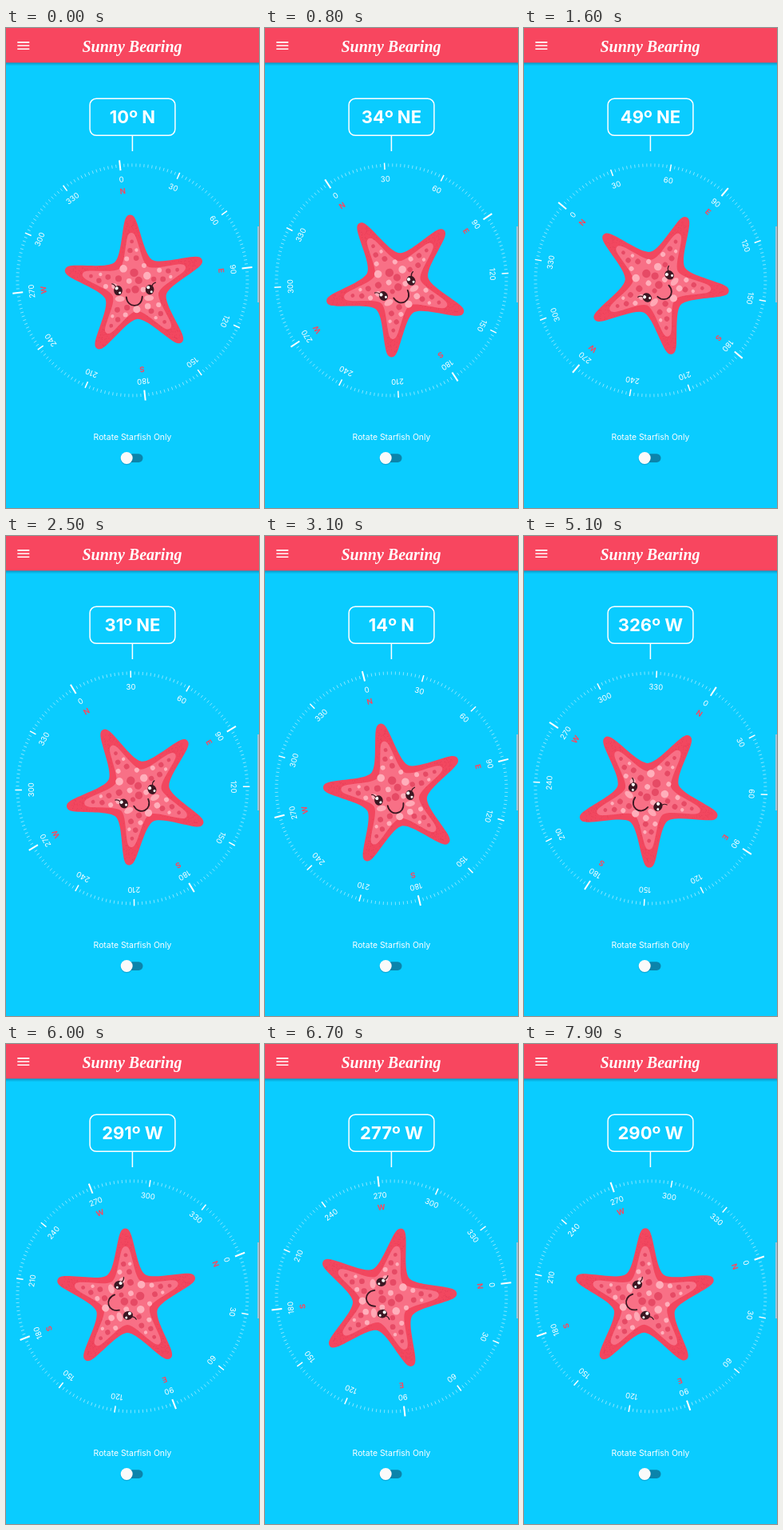
Animation of 317 by 600 pixels, one loop 8000 ms. Source, as an HTML page:

```html
<!DOCTYPE html>
<html lang="en">
<head>
<meta charset="utf-8">
<title>Sunny Bearing</title>
<style>
  html, body { margin: 0; width: 100%; height: 100%; overflow: hidden; background: #0accff; }
  svg { display: block; }
  text { font-family: Inter, "Open Sans", sans-serif; fill: #fff; text-anchor: middle; }
  .title { font: italic bold 20px "Liberation Serif", "Noto Serif", serif; }
  .reading { font-size: 22px; font-weight: 700; }
  .hint { font-size: 10.4px; }
  .degree { font-size: 9.6px; }
  .cardinal { font-size: 9.5px; font-weight: 700; fill: #f8485f; }
  .line { fill: none; stroke: #fff; }
  .ink { fill: none; stroke: #3b1722; stroke-linecap: round; }
</style>
</head>
<body>
<svg width="317" height="600" viewBox="0 0 317 600">
  <defs>
    <linearGradient id="shade" x2="0" y2="1">
      <stop stop-color="#05608a" stop-opacity=".5"/>
      <stop offset="1" stop-color="#05608a" stop-opacity="0"/>
    </linearGradient>
    <g id="eye">
      <ellipse rx="5.3" ry="6.2" fill="#3b1722"/>
      <circle cx="-1.8" cy="-2.8" r="2.1" fill="#fff"/>
      <circle cx="2" cy="2.8" r="1.5" fill="#fff"/>
    </g>
  </defs>

  <rect width="317" height="600" fill="#0accff"/>
  <rect y="43" width="317" height="4.5" fill="url(#shade)"/>
  <rect width="317" height="43.3" fill="#f8465f"/>
  <path class="line" stroke-width="1.65" d="M14.3 17.8h15M14.3 22h15M14.3 26.2h15"/>
  <text class="title" x="158" y="30">Sunny Bearing</text>

  <rect class="line" x="105.1" y="88.3" width="106.8" height="46" rx="8" stroke-width="1.5"/>
  <path class="line" stroke-width="1.5" d="M158.4 134.5V154"/>
  <text class="reading" id="reading" x="158.4" y="119"></text>

  <g id="dial">
    <g id="scale"></g>
    <g id="star" transform="translate(2.5 8.7) rotate(2)"></g>
    <g transform="translate(.6 12.3) rotate(4.5)">
      <ellipse cx="-18" cy="10.5" rx="6" ry="3.6" fill="#ffa8b5"/>
      <ellipse cx="18.5" cy="10.5" rx="6" ry="3.6" fill="#ffa8b5"/>
      <use href="#eye" x="-19.8"/>
      <use href="#eye" x="19.8"/>
      <path class="ink" stroke-width="1.2" d="M-22.8-4.6q-1-3.2-4.6-4M22.8-4.6q1-3.2 4.6-4"/>
      <path class="ink" stroke-width="1.8" d="M-9.8 8.5C-9 23 9.5 23 10.2 8.5"/>
    </g>
  </g>

  <text class="hint" x="158.5" y="515">Rotate Starfish Only</text>
  <rect x="146" y="532.3" width="25.5" height="10.6" rx="5.3" fill="#0b84ab"/>
  <circle cx="151.2" cy="538.4" r="7.8" fill="#05608a" opacity=".3"/>
  <circle cx="151.2" cy="537.5" r="7.5" fill="#fafafa"/>
  <rect x="315" y="248" width="2" height="95" fill="#9cc4d8"/>
</svg>

<script>
const $ = id => document.getElementById(id);
const RAD = Math.PI / 180;

function add(parent, tag, attrs, label) {
  const node = document.createElementNS('http://www.w3.org/2000/svg', tag);
  for (const key in attrs) node.setAttribute(key, attrs[key]);
  if (label !== undefined) node.textContent = label;
  return parent.appendChild(node);
}

function buildScale() {
  const scale = $('scale');
  for (let deg = 0; deg < 360; deg += 2) {
    const cardinal = deg % 90 === 0, major = deg % 30 === 0;
    const [from, to, width] = cardinal ? [138, 151, 2] : major ? [138.5, 147, 1.5] : [142, 146, .6];
    const transform = `rotate(${deg})`;
    add(scale, 'path', { d: `M0-${from}V-${to}`, stroke: '#fff', 'stroke-width': width,
      'stroke-opacity': major ? 1 : .8, transform });
    if (major) add(scale, 'text', { class: 'degree', y: -127, dy: '.36em', transform }, deg);
    if (cardinal) add(scale, 'text', { class: 'cardinal', y: -112, dy: '.36em', transform }, 'NESW'[deg / 90]);
  }
}

// Position along an arm: u outward from the centre, v sideways.
function armPoint(arm, u, v) {
  const a = (arm * 72 - 90) * RAD;
  return [u * Math.cos(a) - v * Math.sin(a), u * Math.sin(a) + v * Math.cos(a)];
}

function starPath(size) {
  const half = [[32.5, 23.6], [38.5, 16], [60, 13.2], [78, 8.6], [86, 6.5], [90.5, 4.5], [90.5, 0]];
  const outline = [...half.map(([u, v]) => [u, -v]), ...half.slice(0, -1).reverse()];
  let d = '';
  for (let arm = 0; arm < 5; arm++) {
    outline.forEach(([u, v], i) => {
      if (i === 0 && arm > 0) return;
      const p = armPoint(arm, u * size, v * size).map(n => n.toFixed(2)).join(' ');
      d += (i === 0 ? 'M' : i % 3 === 1 ? 'C' : ' ') + p;
    });
  }
  return d + 'Z';
}

function buildStar() {
  const star = $('star');
  const dark = '#e64a65', light = '#ffafbb';
  const dot = ([cx, cy], r, fill) => add(star, 'circle', { cx, cy, r, fill });

  add(star, 'path', { d: starPath(1), fill: '#f2475f' });

  // Fine grain on the skin
  let seed = 7;
  const rand = () => (seed = seed * 16807 % 2147483647) / 2147483647;
  let grain = '';
  for (let i = 0; i < 600; i++) {
    const u = 30 + 54 * rand();
    const reach = u < 50 ? 14 : 13 - (u - 50) * .2;
    const [x, y] = armPoint(i % 5, u, (rand() * 2 - 1) * reach);
    grain += `M${x.toFixed(1)} ${y.toFixed(1)}h.7`;
  }
  add(star, 'path', { d: grain, stroke: '#d5304e', 'stroke-width': .7, opacity: .6 });

  add(star, 'path', { d: starPath(.75), fill: '#f87086' });

  for (let arm = 0; arm < 5; arm++) {
    dot(armPoint(arm, 57, 0), 2.4, dark);
    dot(armPoint(arm, 46, -3), 3.2, dark);
    dot(armPoint(arm, 46, 5), 2.2, light);
    dot(armPoint(arm, 36, 4), 3.4, dark);
    dot(armPoint(arm, 36, -8), 3, light);
  }
  const core = [
    [-13, -24, 4.8], [0, -18, 5.2], [13, -26, 3], [-20, -12, 4], [-7, -8, 3.4], [5, -8, 4.6],
    [16, -13, 4.8], [24, -8, 3.2], [-26, -3, 3.4], [0, 3, 4.8], [10, 4, 3.4], [-9, 4, 3],
    [0, 28, 4.6], [-12, 25, 3.6], [14, 25, 3.8]
  ];
  core.forEach(([x, y, r], i) => dot([x, y], r, i % 2 ? dark : light));
}

// Monotone cubic curve through the key values.
const times = [0, 1600, 3100, 4400, 5100, 6700, 7900];
const dialKeys = [6.2, 49.8, 14, -7.8, -33.1, -83.5, -70.7];
const headingKeys = [10, 49, 14, -8, -34, -83, -70];

function curve(keys) {
  const slope = i => (keys[i + 1] - keys[i]) / (times[i + 1] - times[i]);
  const last = keys.length - 1;
  const tangent = keys.map((_, i) => {
    if (i === 0) return slope(0);
    if (i === last) return slope(last - 1);
    const a = slope(i - 1), b = slope(i);
    return a * b > 0 ? 2 * a * b / (a + b) : 0;
  });
  return t => {
    let i = 0;
    while (i < last - 1 && t >= times[i + 1]) i++;
    const span = times[i + 1] - times[i], s = (t - times[i]) / span, q = 1 - s;
    return keys[i] * (1 + 2 * s) * q * q + keys[i + 1] * s * s * (3 - 2 * s)
      + span * s * q * (tangent[i] * q - tangent[i + 1] * s);
  };
}

const dialAt = curve(dialKeys), headingAt = curve(headingKeys);

function direction(deg) {
  if (deg < 22.5 || deg >= 337.5) return 'N';
  return deg < 67.5 ? 'NE' : 'W';
}

function draw(now) {
  const t = Math.floor(now % 8000 / 100) * 100;
  const deg = (Math.round(headingAt(t)) + 360) % 360;
  $('dial').setAttribute('transform', `translate(158.4 315.4) rotate(${(-dialAt(t)).toFixed(2)})`);
  $('reading').textContent = `${deg}º ${direction(deg)}`;
}

buildScale();
buildStar();
draw(0);
const start = performance.now();
requestAnimationFrame(function loop() {
  draw(performance.now() - start);
  requestAnimationFrame(loop);
});
</script>
</body>
</html>
```
